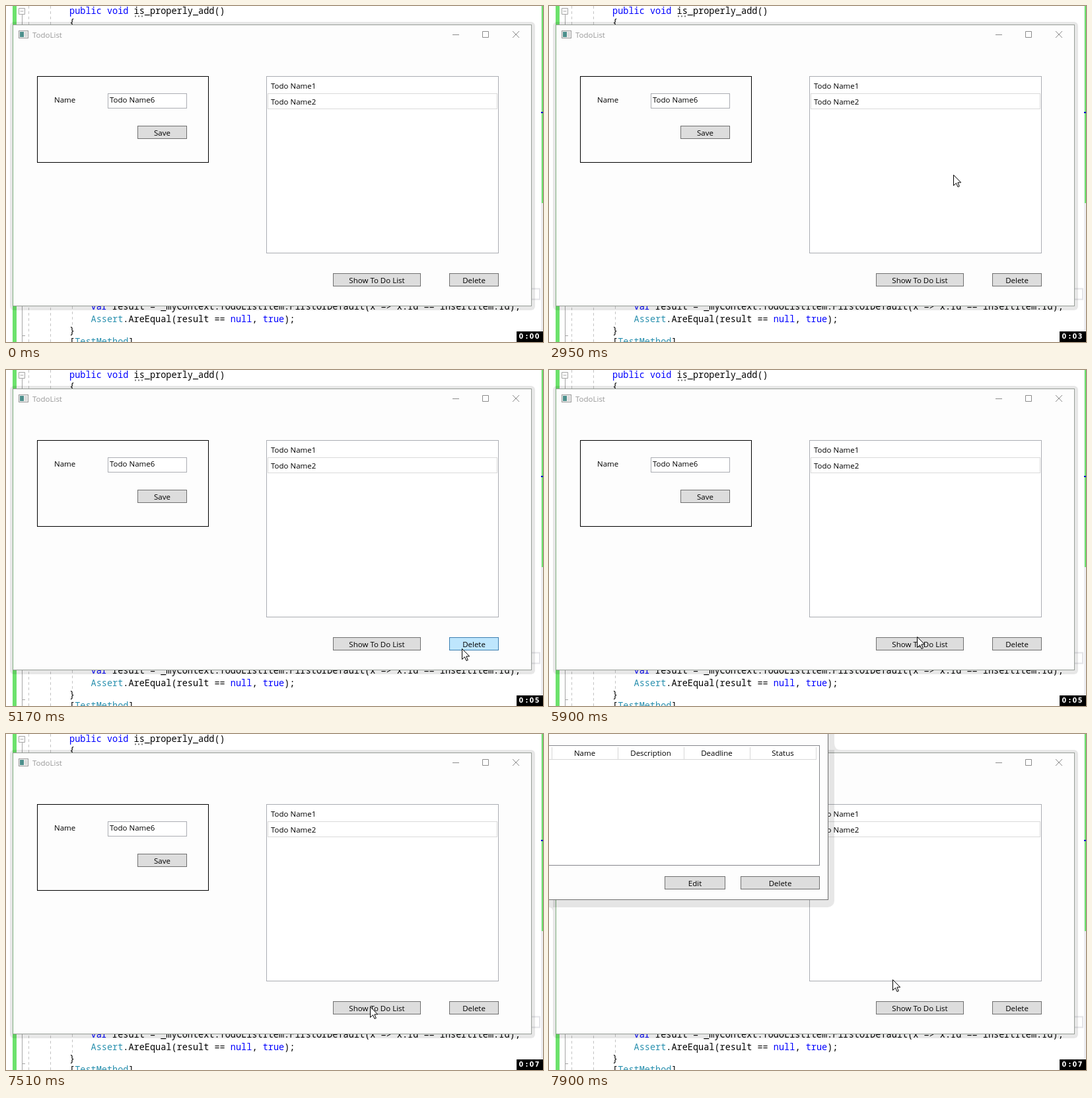
Animation of 813x508 px, one loop 8 s. Source, as an HTML page:

```html
<!DOCTYPE html>
<html lang="en">
<head>
<meta charset="utf-8">
<title>Todo window</title>
<style>
  html, body { margin: 0; width: 100%; height: 100%; overflow: hidden; background: #fff; }
  svg { display: block; }
  text { white-space: pre; font: 11.5px "Open Sans", "Noto Sans", sans-serif; fill: #000; }
  .code text { font: 13.55px "Noto Sans Mono", "DejaVu Sans Mono", monospace; }
  .code .key { fill: #00f; }
  .code .type { fill: #2b91af; }
  .guide { stroke: #c4c4c4; stroke-dasharray: 4 4; }
  .gutter { stroke: #a5a5a5; fill: none; }
  .shadow { fill: #000; fill-opacity: .095; }
  .glow { fill: #000; fill-opacity: .05; visibility: hidden; }
  .pane { fill: #fdfdfd; stroke: #979d97; }
  .title { fill: #999; }
  .controls { fill: none; stroke: #8c8c8c; }
  .active .title { fill: #000; }
  .active .controls { stroke: #000; }
  .active .glow { visibility: visible; }
  .field { fill: #fff; stroke: #abadb3; }
  .button rect { fill: #ddd; stroke: #707070; }
  .button text, .head text { text-anchor: middle; }
  .button.hover rect { fill: #bee6fd; stroke: #3c7fb1; }
  .button.press rect { fill: #c4e5f6; stroke: #2c628b; }
  .clock text { font: bold 9.6px "DejaVu Sans", sans-serif; fill: #fff; }
  .cursor { fill: #fff; stroke: #000; }
</style>
</head>
<body>
<svg width="813" height="508" viewBox="0 0 813 508">
  <defs>
    <path id="arrow" d="M.5 .5V16.5L4.5 12.8L7 18.5L9.3 17.5L6.9 11.9H11.7Z"/>
    <path id="beam" d="M0 .5H3M4 .5H7M3.5 1V15M0 15.5H3M4 15.5H7"/>
    <path id="resize" d="M4.5 .7L8.4 4.9H5.5V18.1H8.4L4.5 22.3L.6 18.1H3.5V4.9H.6Z"/>
  </defs>

  <!-- editor behind the windows -->
  <rect width="813" height="508" fill="#fff"/>
  <rect x="10" width="6" height="508" fill="#6ce26c"/>
  <rect x="810" width="3" height="508" fill="#ececf0"/>
  <rect x="811" width="2" height="298" fill="#6ce26c"/>
  <rect x="810" y="160" width="3" height="2" fill="#0000cd"/>
  <rect x="700" y="427.5" width="108" height="16" fill="none" stroke="#e4e4e8" stroke-width="2"/>
  <path class="gutter" d="M19.5 3.5H28.5V12.5H19.5ZM21.5 8H26.5M24.5 13V508M24.5 498.5H29"/>
  <path class="guide" d="M34.5 0V508M67.5 0V508M100.5 30V483"/>
  <path d="M195 15.5h2m3 0h2m3 0h2" stroke="#777" stroke-width="2"/>
  <g class="code">
    <text x="96" y="12"><tspan class="key">public void</tspan> is_properly_add()</text>
    <text x="96" y="29">{</text>
    <text x="128.5" y="459"><tspan class="key">var</tspan> result = _myContext.TodoListItem.FirstOrDefault(x =&gt; x.Id == insertItem.Id);</text>
    <text x="128.5" y="478"><tspan class="type">Assert</tspan>.AreEqual(result == <tspan class="key">null</tspan>, <tspan class="key">true</tspan>);</text>
    <text x="96" y="495">}</text>
    <text x="96" y="512">[<tspan class="type">TestMethod</tspan>]</text>
  </g>

  <g id="main">
    <rect class="glow" x="0" y="17" width="810" height="459" rx="12"/>
    <rect class="shadow" x="6" y="24" width="795" height="436" rx="6"/>
    <rect class="pane" x="10.5" y="28.5" width="785" height="425"/>
    <path d="M10.5 28V454" stroke="#7fae7f"/>
    <rect x="19.5" y="37.5" width="14" height="11" fill="#f4f4f4" stroke="#999"/>
    <rect x="21" y="39" width="6" height="8" fill="#4d8f8c"/>
    <rect x="28" y="39" width="4" height="8" fill="#dcdcdc"/>
    <text class="title" x="40" y="48">TodoList</text>
    <path class="controls" d="M676 43.5H686M721.5 38.5H730.5V47.5H721.5ZM767 38L777 48M777 38L767 48"/>

    <rect x="47.5" y="106.5" width="259" height="130" fill="none" stroke="#000"/>
    <text x="73" y="146">Name</text>
    <rect class="field" x="154.5" y="132.5" width="119" height="22"/>
    <text x="157" y="146">Todo Name6</text>
    <g class="button">
      <rect x="199.5" y="181.5" width="74" height="19"/>
      <text x="236.5" y="196">Save</text>
    </g>

    <rect class="field" x="394.5" y="106.5" width="351" height="267"/>
    <text x="401" y="125">Todo Name1</text>
    <rect x="396.5" y="132.5" width="347" height="23" fill="none" stroke="#dadada"/>
    <text x="401" y="149">Todo Name2</text>
    <g class="button" id="show">
      <rect x="495.5" y="404.5" width="132" height="19"/>
      <text x="561.5" y="419">Show To Do List</text>
    </g>
    <g class="button" id="remove">
      <rect x="671.5" y="404.5" width="74" height="19"/>
      <text x="708.5" y="419">Delete</text>
    </g>
  </g>

  <g id="popup">
    <rect class="shadow" x="-30" y="-30" width="462" height="292" rx="10"/>
    <path class="shadow" d="M432 14Q432 24 442 24H432ZM0 262Q6 262 6 270V262Z"/>
    <rect class="pane" x="-20.5" y="-20.5" width="443" height="271" style="stroke:#707070"/>
    <rect x="-10.5" y="17.5" width="420" height="181" fill="#fff" stroke="#85868c"/>
    <path d="M0 38.5H405M4.5 20V38m100 -18v18m100 -18v18m100 -18v18m100 -18v18" stroke="#d8d8d8" fill="none"/>
    <g class="head">
      <text x="54" y="33">Name</text>
      <text x="154" y="33">Description</text>
      <text x="254" y="33">Deadline</text>
      <text x="354" y="33">Status</text>
    </g>
    <g class="button">
      <rect x="175.5" y="215.5" width="91" height="19"/>
      <text x="221" y="230">Edit</text>
    </g>
    <g class="button">
      <rect x="290.5" y="215.5" width="119" height="19"/>
      <text x="350" y="230">Delete</text>
    </g>
  </g>

  <g class="clock">
    <rect x="773" y="492" width="40" height="16"/>
    <text id="time" x="776.5 786.5 792.5 800.8" y="503">0:00</text>
  </g>
  <use id="cursor" class="cursor"/>
</svg>

<script>
  const LOOP = 8000;
  const TICKS = [960, 1920, 2950, 4050, 5020, 6050, 7010];

  // start time, x, y, shape
  const MOVES = [
    [0], [2300, 713, 495, "beam"], [2450, 655, 445, "arrow"],
    [2600, 590, 330, "arrow"], [2720, 537, 216, "arrow"], [2840, 560, 222, "arrow"],
    [2950, 612, 255, "arrow"], [3090, 665, 360, "arrow"], [3220, 688, 441, "arrow"],
    [3370], [4180, 743, 484, "beam"], [4330, 729, 446, "resize"],
    [4480, 712, 439, "arrow"], [4640, 705, 434, "arrow"], [4790, 700, 429, "arrow"],
    [5170, 690, 421, "arrow"], [5310, 676, 415, "arrow"], [5440, 656, 409, "arrow"],
    [5590, 578, 400, "arrow"], [5740, 558, 398, "arrow"], [5900, 557, 403, "arrow"],
    [6050, 556, 409, "arrow"], [6150, 554, 415, "arrow"], [6300, 552, 411, "arrow"],
    [7130, 551, 412, "arrow"], [7630, 588, 410, "arrow"], [7780, 556, 392, "arrow"],
    [7900, 520, 371, "arrow"]
  ];

  const $ = id => document.getElementById(id);
  const [main, popup, show, remove, time, cursor] =
    ["main", "popup", "show", "remove", "time", "cursor"].map($);
  const during = (t, from, to) => t >= from && t < to;

  function draw(t) {
    time.textContent = "0:0" + TICKS.filter(tick => tick <= t).length;

    const [, x, y, shape] = MOVES.filter(move => move[0] <= t).pop();
    cursor.style.display = shape ? "" : "none";
    if (shape) {
      cursor.setAttribute("href", "#" + shape);
      cursor.setAttribute("transform", `translate(${x} ${y})`);
    }

    const pressed = during(t, 7390, 7510);
    main.classList.toggle("active", pressed);
    show.classList.toggle("press", pressed);
    show.classList.toggle("hover", during(t, 6050, 7390));
    remove.classList.toggle("hover", during(t, 5170, 5440));

    const opening = t < 7780;
    popup.style.display = t < 7630 ? "none" : "";
    popup.setAttribute("opacity", opening ? 0.6 : 1);
    popup.setAttribute("transform", opening ? "scale(.96)" : "");
  }

  function frame() {
    draw(performance.now() % LOOP);
    requestAnimationFrame(frame);
  }
  frame();
</script>
</body>
</html>
```
